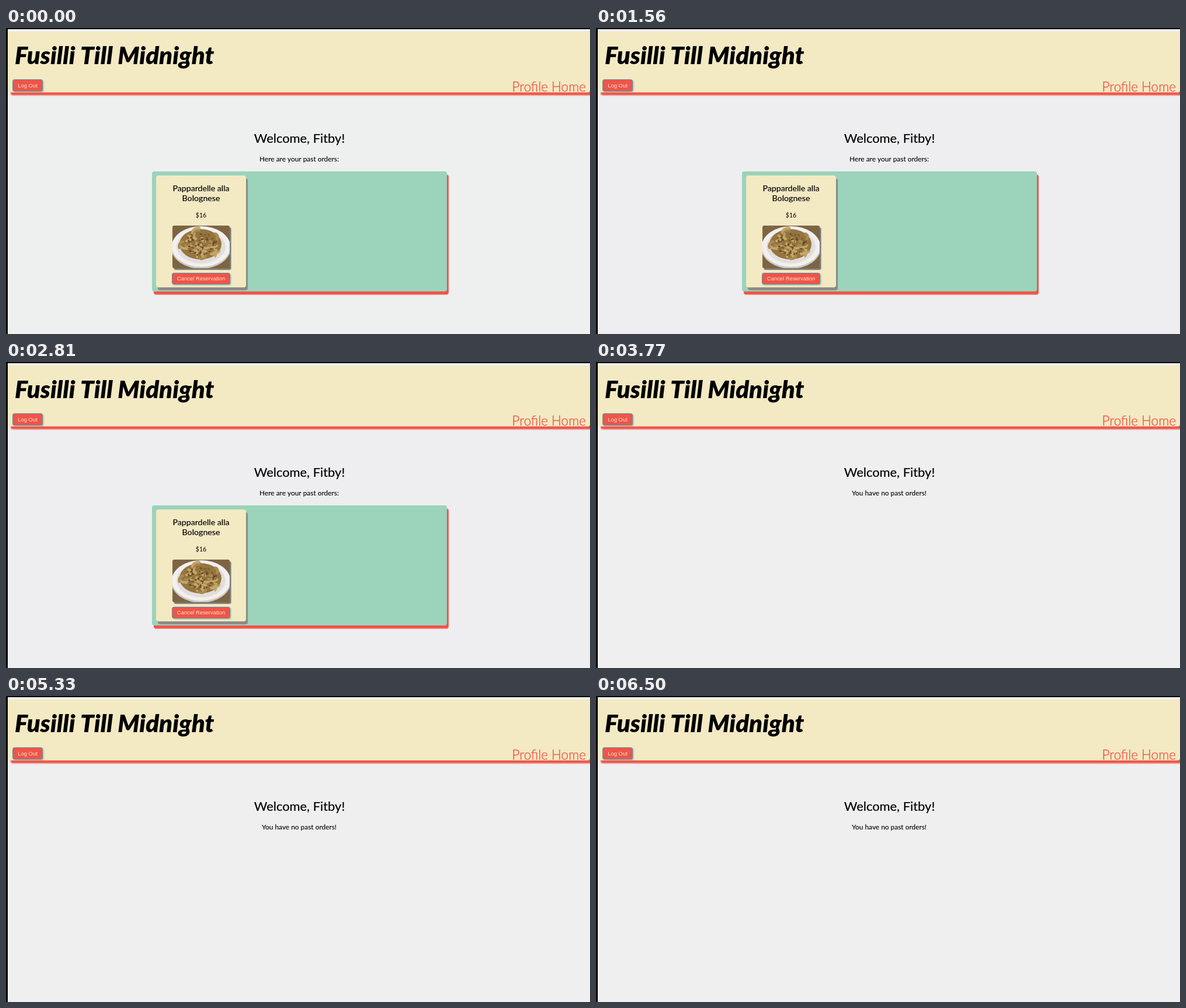
These frames come from a looping animation (1000 px wide and 525 px high, 7150 ms). An HTML page with a canvas:

```html
<!DOCTYPE html>
<html lang="en">
<head>
<meta charset="utf-8">
<title>Past orders</title>
<style>
  html, body { margin: 0; width: 100%; height: 100%; overflow: hidden; background: #efefef; }
  canvas { display: block; width: 1000px; height: 525px; }
</style>
</head>
<body>
<canvas id="stage" width="1000" height="525"></canvas>
<script>
const ctx = document.getElementById('stage').getContext('2d');
const LOOP = 7150;
const CREAM = '#f3e9c2', RED = '#f0544a', MINT = '#9bd3bb', GRAY = '#8c8b84', STEEL = '#5d8fa6';
const LATO = 'Lato, "Open Sans", sans-serif';
const ARIAL = '"Liberation Sans", Arial, sans-serif';

const steps = [
  { until: 1560, bg: '#eef0f0', orders: true },
  { until: 3640, bg: '#eeeef0', orders: true },
  { until: 3770, bg: '#efefef', orders: true, pressed: true },
  { until: 6370, bg: '#efefef' },
  { until: 6500, bg: '#f0f0ef', hover: true },
  { until: LOOP, bg: '#efefef' }
];

function box(x, y, w, h, r, fill, shadow) {
  ctx.save();
  if (shadow) {
    [ctx.shadowOffsetX, ctx.shadowOffsetY, ctx.shadowBlur, ctx.shadowColor] = shadow;
  }
  ctx.fillStyle = fill;
  ctx.beginPath();
  ctx.roundRect(x, y, w, h, r);
  ctx.fill();
  ctx.restore();
}

function text(str, x, y, font, color = '#000', align = 'center', weight = 0) {
  ctx.font = font;
  ctx.fillStyle = ctx.strokeStyle = color;
  ctx.textAlign = align;
  ctx.fillText(str, x, y);
  if (weight) {
    ctx.lineWidth = weight;
    ctx.lineJoin = 'round';
    ctx.strokeText(str, x, y);
  }
}

function button(label, x, y, w, h, border, spread = 1.5) {
  box(x, y, w, h, 4, border, [spread, spread, 2, 'rgba(120,150,140,.55)']);
  box(x + 1, y + 1, w - 2, h - 2, 3, RED);
  text(label, x + w / 2, y + h / 2 + 3.4, '9.45px ' + ARIAL, CREAM);
}

function oval(x, y, rx, ry, fill) {
  ctx.fillStyle = fill;
  ctx.beginPath();
  ctx.ellipse(x, y, rx, ry, 0, 0, Math.PI * 2);
  ctx.fill();
}

function dish() {
  let seed = 17;
  const rand = () => (seed = seed * 16807 % 2147483647) / 2147483647;
  const spot = (rx, ry) => {
    const a = rand() * Math.PI * 2, d = Math.sqrt(rand());
    return [333 + Math.cos(a) * d * rx, 371 + Math.sin(a) * d * ry];
  };
  box(285, 339, 98, 73, 3, '#7d6543', [2.5, 3, 1, '#777a78']);
  ctx.save();
  ctx.beginPath();
  ctx.roundRect(285, 339, 98, 73, 3);
  ctx.clip();
  oval(334, 377, 51, 36, '#cfc8bf');
  oval(334, 375, 50, 35, '#f2eff0');
  oval(334, 375, 42, 29, '#e2dedb');
  oval(333, 371, 36, 26, '#95753f');
  ctx.lineCap = 'round';
  for (let i = 0; i < 26; i++) {
    const [x, y] = spot(30, 21), turn = rand() * 6;
    ctx.strokeStyle = i % 3 ? '#c4a66a' : '#ab8a50';
    ctx.lineWidth = 3 + rand() * 2;
    ctx.beginPath();
    ctx.arc(x, y, 5 + rand() * 5, turn, turn + 1.8);
    ctx.stroke();
  }
  for (let i = 0; i < 70; i++) {
    const [x, y] = spot(28, 19);
    oval(x, y, 0.8 + rand() * 1.5, 0.7 + rand(), i % 2 ? '#5d4323' : '#7c592d');
  }
  ctx.restore();
}

function header(hover) {
  box(3, 6, 997, 104.5, [0, 0, 4, 4], CREAM, [5, 5, 2, RED]);
  ctx.fillStyle = '#000';
  ctx.fillRect(0, 0, 1000, 2);
  ctx.fillRect(0, 0, 3, 525);
  text('Fusilli Till Midnight', 15, 62, 'italic 900 41.8px ' + LATO, '#000', 'left');
  text('Profile Home', 993, 109, '300 22.5px ' + LATO, RED, 'right', 0.35);
  button('Log Out', 11, 88, 52, 21, STEEL, hover ? 3 : 1.5);
}

function orders(pressed) {
  box(250, 246, 505, 206, 4, MINT, [3, 5.5, 1, RED]);
  box(257, 253, 154, 192, 4, CREAM, [3, 5, 1, GRAY]);
  text('Pappardelle alla', 334, 280, '14.2px ' + LATO, '#000', 'center', 0.15);
  text('Bolognese', 334, 297, '14.2px ' + LATO, '#000', 'center', 0.15);
  text('$16', 334, 325, '10.5px ' + LATO);
  dish();
  button('Cancel Reservation', 284, 420, 100, 20, pressed ? '#2465c9' : STEEL);
}

function draw(step) {
  ctx.fillStyle = step.bg;
  ctx.fillRect(0, 0, 1000, 525);
  header(step.hover);
  text('Welcome, Fitby!', 502.5, 197, '21.9px ' + LATO, '#000', 'center', 0.2);
  text(step.orders ? 'Here are your past orders:' : 'You have no past orders!',
    502, 229, '11.9px ' + LATO, '#000', 'center', 0.1);
  if (step.orders) orders(step.pressed);
}

const start = performance.now();
function tick() {
  const t = (performance.now() - start) % LOOP;
  draw(steps.find(s => t < s.until));
  requestAnimationFrame(tick);
}
tick();
</script>
</body>
</html>
```
